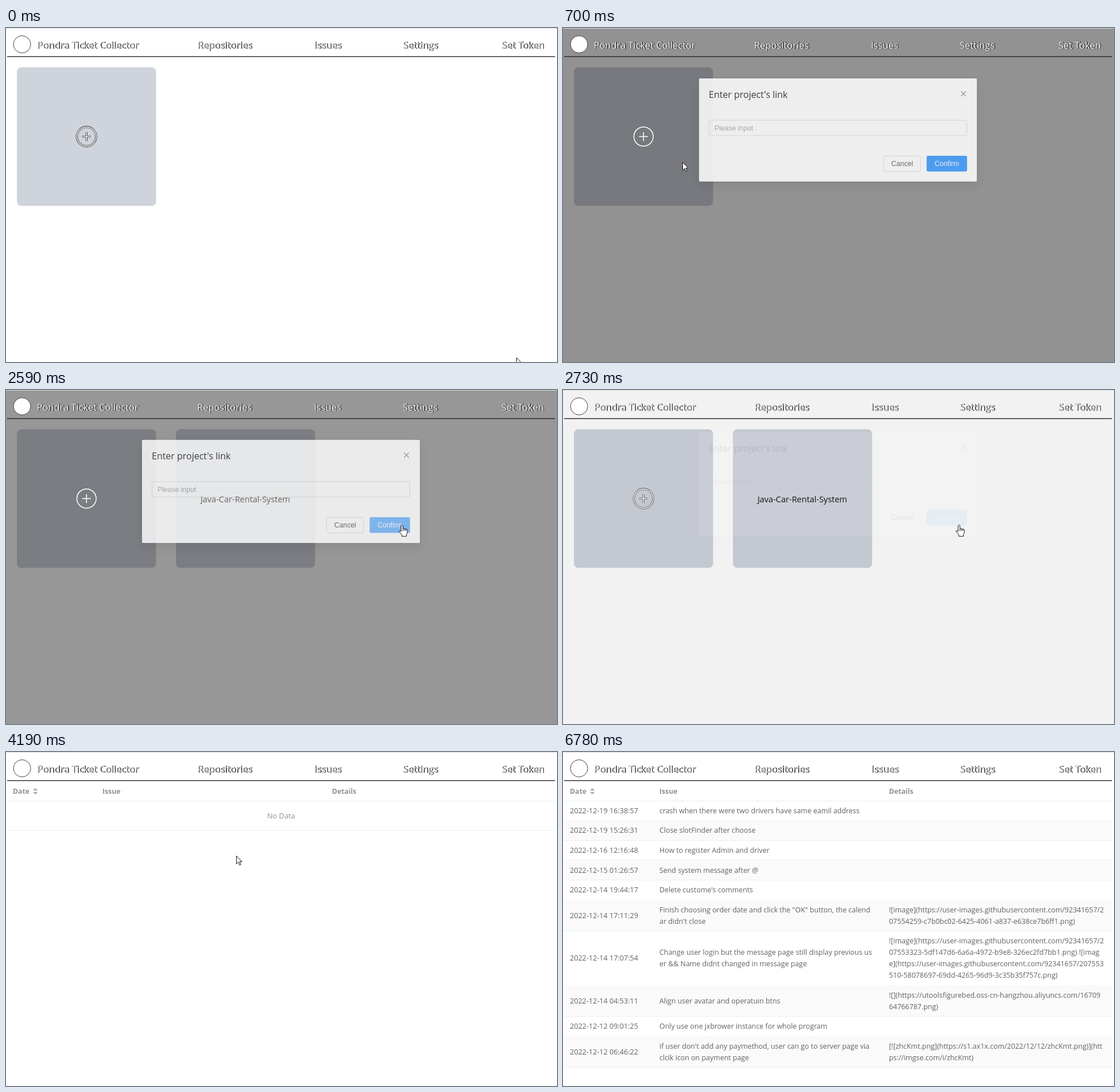
Animation of 960 by 583 pixels, one loop 7680 ms. Source, as an HTML page with a canvas:

```html
<!DOCTYPE html>
<html lang="en">
<head>
<meta charset="utf-8">
<title>Issues collector</title>
<style>
  html, body { margin: 0; width: 100%; height: 100%; overflow: hidden; background: #fff; }
  canvas { display: block; width: 100vw; height: 100vh; }
</style>
</head>
<body>
<canvas id="stage" width="960" height="583"></canvas>
<script>
const main = document.getElementById('stage').getContext('2d');
const layer = document.createElement('canvas');
layer.width = 960;
layer.height = 583;
const layerCtx = layer.getContext('2d');
let ctx = main;

const LOOP = 7680, STEP = 70;
const SANS = '"Open Sans", "Noto Sans", sans-serif';
const ARIAL = '"Liberation Sans", Arial, sans-serif';
const BODY = '12.4px ' + SANS;

const NAV = [['Pondra Ticket Collector', 54], ['Repositories', 333.5], ['Issues', 537],
  ['Settings', 691.5], ['Set Token', 863.5]];

// bottom edge, date, issue lines, detail lines
const ROWS = [
  [119.5, '2022-12-19 16:38:57', ['crash when there were two drivers have same eamil address'], []],
  [154, '2022-12-19 15:26:31', ['Close slotFinder after choose'], []],
  [188.5, '2022-12-16 12:16:48', ['How to register Admin and driver'], []],
  [223.5, '2022-12-15 01:26:57', ['Send system message after @'], []],
  [258, '2022-12-14 19:44:17', ["Delete custome's comments"], []],
  [312.5, '2022-12-14 17:11:29',
    ['Finish choosing order date and click the "OK" button, the calend', "ar didn't close"],
    ['![image](https://user-images.githubusercontent.com/92341657/2',
     '07554259-c7b0bc02-6425-4061-a837-e638ce7b6ff1.png)']],
  [407, '2022-12-14 17:07:54',
    ['Change user login but the message page still display previous us',
     'er && Name didnt changed in message page'],
    ['![image](https://user-images.githubusercontent.com/92341657/2',
     '07553323-5df147d6-6a6a-4972-b9e8-326ec2fd7bb1.png) ![imag',
     'e](https://user-images.githubusercontent.com/92341657/207553',
     '510-58078697-69dd-4265-96d9-3c35b35f757c.png)']],
  [461.5, '2022-12-14 04:53:11', ['Align user avatar and operatuin btns'],
    ['![](https://utoolsfigurebed.oss-cn-hangzhou.aliyuncs.com/16709', '64766787.png)']],
  [496, '2022-12-12 09:01:25', ['Only use one jxbrower instance for whole program'], []],
  [550.5, '2022-12-12 06:46:22',
    ["if user don't add any paymethod, user can go to server page via", 'clcik icon on payment page'],
    ['[![zhcKmt.png](https://s1.ax1x.com/2022/12/12/zhcKmt.png)](htt', 'ps://imgse.com/i/zhcKmt)']]
];

// pointer path: time, x, y
const PATH = [[0, 889, 575], [490, 142, 194], [560, 142, 194], [700, 208, 234], [1050, 300, 172],
  [1940, 300, 172], [2380, 690, 235], [3000, 690, 235], [3570, 562, 31], [3740, 562, 31],
  [4190, 401, 181], [5500, 401, 181], [6070, 620, 440], [6270, 620, 440], [6780, 880, 600]];

const clamp = v => Math.max(0, Math.min(1, v));
const smooth = v => v * v * (3 - 2 * v);

// cubic-bezier(.25, .1, .25, 1)
function ease(x) {
  x = clamp(x);
  let lo = 0, hi = 1;
  for (let i = 0; i < 20; i++) {
    const m = (lo + hi) / 2, n = 1 - m;
    if (0.75 * n * n * m + 0.75 * n * m * m + m * m * m < x) lo = m; else hi = m;
  }
  const n = 1 - lo;
  return 0.3 * n * n * lo + 3 * n * lo * lo + lo * lo * lo;
}

function text(s, x, y, font, color, align = 'left') {
  ctx.font = font;
  ctx.fillStyle = color;
  ctx.textAlign = align;
  ctx.fillText(s, x, y);
}

function box(x, y, w, h, r, fill, line) {
  ctx.beginPath();
  ctx.roundRect(x, y, w, h, r);
  if (fill) { ctx.fillStyle = fill; ctx.fill(); }
  if (line) { ctx.strokeStyle = line; ctx.lineWidth = 1; ctx.stroke(); }
}

function rule(y, color, h = 1) {
  ctx.fillStyle = color;
  ctx.fillRect(2, y - h / 2, 954.5, h);
}

function header() {
  ctx.beginPath();
  ctx.arc(28, 28.5, 15, 0, 7);
  ctx.fillStyle = '#fff';
  ctx.fill();
  ctx.strokeStyle = '#444';
  ctx.lineWidth = 1;
  ctx.stroke();
  ctx.lineWidth = 0.7;
  ctx.lineJoin = 'round';
  ctx.strokeStyle = '#1a1a1a';
  const font = '16.5px ' + SANS;
  for (const [s, x] of NAV) {
    text(s, x + 0.6, 36.2, font, '#1a1a1a');
    ctx.strokeText(s, x + 0.6, 36.2);
    text(s, x - 0.3, 35.8, font, '#fff');
  }
  rule(49.9, '#262626', 1.4);
}

function plus(shade) {
  const outline = clamp(1 - shade * 4);
  const draw = (w, color) => {
    ctx.beginPath();
    ctx.arc(140.3, 189.5, 16.8, 0, 7);
    ctx.moveTo(132.5, 189.5); ctx.lineTo(148, 189.5);
    ctx.moveTo(140.3, 181.7); ctx.lineTo(140.3, 197.3);
    ctx.lineWidth = w;
    ctx.strokeStyle = color;
    ctx.stroke();
  };
  if (outline) draw(3.2, `rgba(40,40,40,${outline})`);
  draw(1.5, '#fff');
}

function drawDialog(t) {
  const focus = t >= 1180 && t < 2380, hover = t >= 2310;
  ctx.clearRect(0, 0, 960, 583);
  ctx.shadowColor = 'rgba(0,0,0,.1)';
  ctx.shadowBlur = 20;
  ctx.shadowOffsetY = 8;
  box(237, 91, 484, 180, 2, '#fff');
  ctx.shadowColor = 'transparent';
  text("Enter project's link", 254, 124.5, '16px ' + SANS, '#303133');
  ctx.beginPath();
  ctx.moveTo(693.5, 113.5); ctx.lineTo(702, 122);
  ctx.moveTo(702, 113.5); ctx.lineTo(693.5, 122);
  ctx.strokeStyle = '#909399';
  ctx.lineWidth = 1.1;
  ctx.stroke();
  box(254.5, 164, 449, 27, 3, '#fff', focus ? '#8abbe8' : '#dcdfe6');
  text('Please input', 264, 182, '12.2px ' + ARIAL, '#a8abb2');
  if (focus) {
    ctx.fillStyle = '#303133';
    ctx.fillRect(264, 170, 1, 14);
  }
  box(558.5, 226.5, 64.5, 27, 3, '#fff', '#dcdfe6');
  text('Cancel', 591, 244, '12.2px ' + ARIAL, '#606266', 'center');
  box(633.5, 226, 70.5, 27.5, 3, hover ? '#79bbff' : '#409eff');
  text('Confirm', 668.8, 244, '12.2px ' + ARIAL, '#fff', 'center');
}

// the dialog fades as one flat layer
function dialog(p, t) {
  ctx = layerCtx;
  drawDialog(t);
  ctx = main;
  ctx.globalAlpha = p;
  ctx.drawImage(layer, 0, Math.round(-19 * (1 - p)));
  ctx.globalAlpha = 1;
}

function repositories(t) {
  const hasRepo = t >= 2520;
  const p = t < 1500 ? ease((t - 550) / 270) : 1 - ease((t - 2545) / 300);
  box(19, 68.5, 242.5, 242, 8, '#cfd3dc');
  if (hasRepo) box(296, 68.5, 242.5, 242, 8, '#cfd3dc');
  ctx.fillStyle = `rgba(0,0,0,${p / 2})`;
  ctx.fillRect(0, 1, 960, 582);
  plus(p / 2);
  header();
  if (p > 0) dialog(p, t);
  if (hasRepo)
    text('Java-Car-Rental-System', 417, 195.5, '14.5px ' + SANS, `rgba(10,10,10,${1 - p / 2})`, 'center');
}

function lines(list, x, mid) {
  list.forEach((s, i) =>
    text(s, x, mid + 4.5 + 20 * (i - (list.length - 1) / 2), BODY, '#606266'));
}

function caret(y, dy) {
  ctx.beginPath();
  ctx.moveTo(46.8, y); ctx.lineTo(55.4, y); ctx.lineTo(51.1, y + dy);
  ctx.fillStyle = '#a8abb2';
  ctx.fill();
}

function issues(t) {
  header();
  for (const [s, x] of [['Date', 12], ['Issue', 168], ['Details', 568]])
    text(s, x, 72.5, 'bold 12.2px ' + SANS, '#909399');
  caret(67.3, -4.3);
  caret(69.7, 4.3);
  rule(85.5, '#ebeef5');
  if (t < 4960) {
    text('No Data', 479.3, 116, '12.8px ' + SANS, '#909399', 'center');
    rule(137, '#ebeef5');
    return;
  }
  let top = 85;
  ROWS.forEach(([bottom, date, issue, detail], i) => {
    const mid = (top + bottom) / 2;
    if (i % 2) {
      ctx.fillStyle = '#fafafa';
      ctx.fillRect(2, top, 954.5, bottom - top);
    }
    text(date, 12, mid + 4.5, '12.6px ' + SANS, '#606266');
    lines(issue, 168, mid);
    lines(detail, 568, mid);
    rule(Math.floor(bottom) + 0.5, '#ebeef5');
    top = bottom;
  });
}

const ARROW = new Path2D('M.5 .5V14.2L3.8 11.1L6 16.4L8.2 15.4L6 10.4H10.2Z');
const HAND = new Path2D('M-1.6 1.8Q0 -.6 1.6 1.8V7.2Q3.2 5.9 4.3 7.6Q5.8 6.6 6.9 8.3' +
  'Q8.6 7.4 9.2 9.2V14.5L7.6 17.5V20.3H-.2V18L-5.4 11.6Q-4.8 9.4 -1.6 12Z');
const BEAM = new Path2D('M-3 -8H3M0 -8V8M-3 8H3');

function pointer(t) {
  if (t >= 1180 && t < 1950) return;
  let i = 0;
  while (i < PATH.length - 2 && t >= PATH[i + 1][0]) i++;
  const [t0, x0, y0] = PATH[i], [t1, x1, y1] = PATH[i + 1];
  const k = smooth(clamp((t - t0) / (t1 - t0)));
  const x = x0 + (x1 - x0) * k, y = y0 + (y1 - y0) * k;
  const hand = (t > 420 && t < 600) || (t >= 2310 && t < 3080) || (t > 3450 && t < 3800);
  const beam = t > 930 && t < 2030;
  ctx.save();
  ctx.translate(x, y);
  ctx.lineWidth = 1;
  ctx.lineJoin = 'round';
  ctx.strokeStyle = '#111';
  ctx.fillStyle = '#fff';
  const shape = beam ? BEAM : hand ? HAND : ARROW;
  if (!beam) ctx.fill(shape);
  ctx.stroke(shape);
  if (hand && !beam) {
    ctx.beginPath();
    for (const fx of [1.6, 4.3, 6.9]) { ctx.moveTo(fx, 7.5); ctx.lineTo(fx, 11); }
    ctx.stroke();
  }
  ctx.restore();
}

function frame(now) {
  const t = Math.floor((now % LOOP + 10) / STEP) * STEP;
  ctx.fillStyle = '#fff';
  ctx.fillRect(0, 0, 960, 583);
  ctx.fillStyle = '#dcdcdc';
  ctx.fillRect(0, 0, 960, 1);
  if (t < 3780) repositories(t); else issues(t);
  pointer(t);
  requestAnimationFrame(frame);
}
requestAnimationFrame(frame);
</script>
</body>
</html>
```
